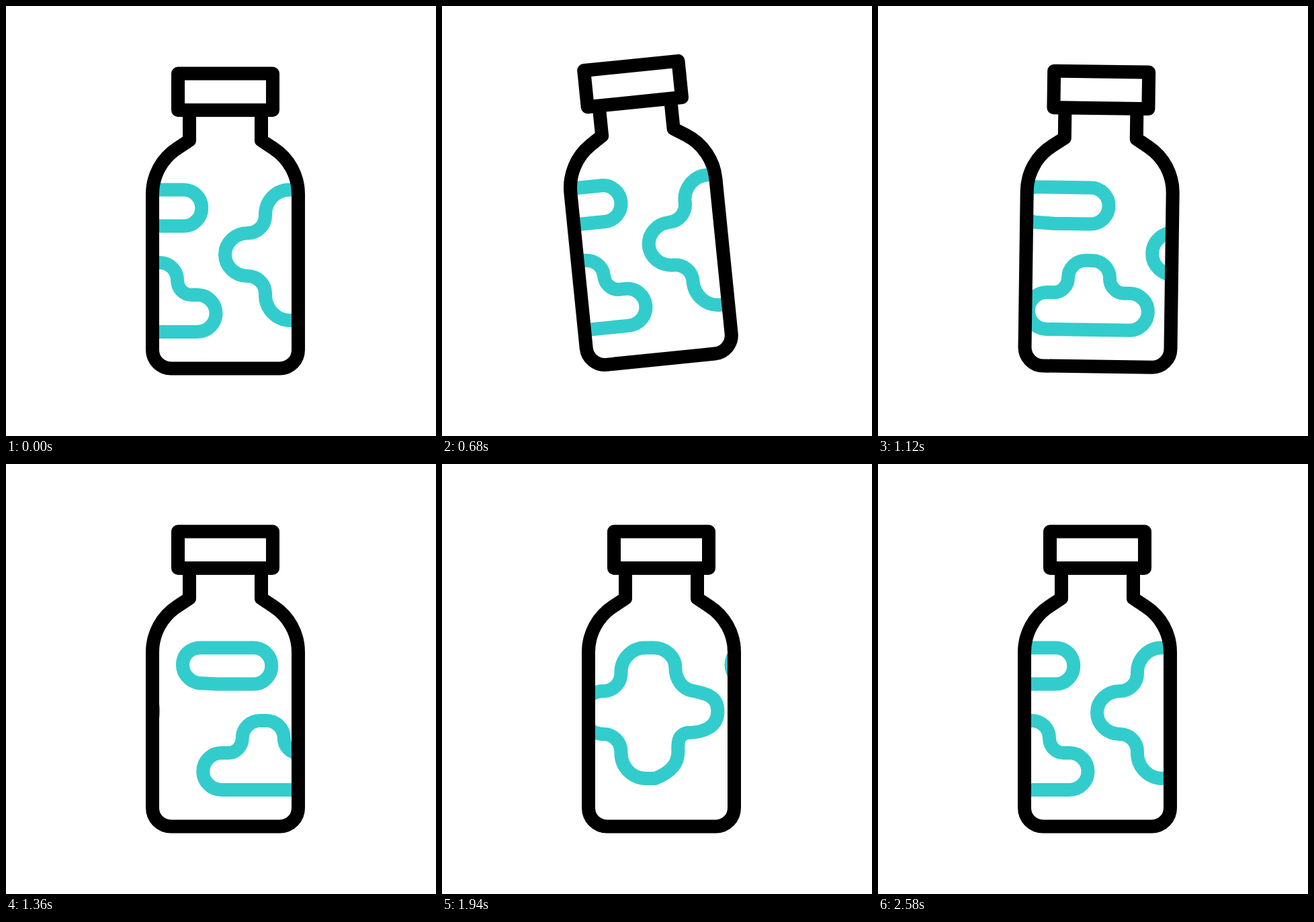
An HTML page that plays this animation: 640x640 px, repeating every 3000 ms.

```html
<!DOCTYPE html>
<html lang="en">
<head>
<meta charset="utf-8">
<title>Bottle</title>
<style>
  html, body { margin: 0; width: 100%; height: 100%; overflow: hidden; background: #fff; }
  svg { display: block; width: 100vw; height: 100vh; }
  path { fill: none; stroke-width: 20; stroke-linejoin: round; }
  .spot { stroke: #33cccc; }
  .glass { stroke: #000; }
</style>
</head>
<body>
<svg viewBox="0 0 640 640">
  <defs>
    <clipPath id="inside"><rect x="218" y="200" width="217" height="340"/></clipPath>
    <path id="pill" class="spot" d="M264.5 273.5A26.8 27 0 0 1 264.5 327.5H210L181 326C168 322 159 312 159 299C159 284 170 273.5 186 273.5Z"/>
    <path id="cloud" class="spot" d="M285 430A27.5 27.5 0 0 1 285 485H162A27.5 27.5 0 0 1 162 430H172A21 22 0 0 0 193 408A26 26 0 0 1 219 382H229A26 26 0 0 1 255 408A21 22 0 0 0 276 430Z"/>
    <path id="blob" class="spot" d="M435 273.5H422A36 36.5 0 0 0 386 310V312A26 26 0 0 1 360 338A34 32 0 0 0 360 402A26 26 0 0 1 386 428V430A37 38 0 0 0 423 468H437C455 461 471 450 471 428C470 408 474 403 484 400C508 400 530 392 530 368C530 344 510 341 490 337C478 334 467 322 467 303C467 287 452 273.5 435 273.5Z"/>
  </defs>
  <g id="bottle">
    <g id="spots" clip-path="url(#inside)"></g>
    <path class="glass" d="M273 155V200L255 211.8A81.4 81.4 0 0 0 218 280V512A27.5 27.5 0 0 0 245.5 539.5H407.5A27.5 27.5 0 0 0 435 512V280A81.4 81.4 0 0 0 398 211.8L380 200V155"/>
    <path class="glass" d="M256 100.5H397V155H256Z"/>
  </g>
</svg>
<script>
const LOOP = 3000;
const bottle = document.getElementById('bottle');
const layer = document.getElementById('spots');

const progress = (t, from, to) => Math.min(1, Math.max(0, (t - from) / (to - from)));
const smooth = (t, from, to) => {
  const u = progress(t, from, to);
  return u * u * (3 - 2 * u);
};

// Lean left, swing three times, then settle upright.
const LEFT = -6, RIGHT = 2.4;
function tilt(t) {
  if (t < 400) return LEFT * smooth(t, 245, 400);
  if (t > 800) return RIGHT * (1 - smooth(t, 800, 1320));
  const swing = (1 - Math.cos(3 * Math.PI * progress(t, 400, 800))) / 2;
  return LEFT + (RIGHT - LEFT) * swing;
}

const lift = t => -14 * smooth(t, 245, 560) * (1 - smooth(t, 640, 1320));

// Each spot travels one lap to the right; its twin follows a lap behind.
function makeSpot(id, lap, easeIn, easeOut) {
  const twins = [0, -lap].map(offset => {
    const node = document.createElementNS('http://www.w3.org/2000/svg', 'use');
    node.setAttribute('href', '#' + id);
    layer.append(node);
    return { node, offset };
  });
  return t => {
    const u = progress(t, 700, 2580);
    const x = lap * (1 - (1 - u ** easeIn) ** easeOut);
    for (const { node, offset } of twins) node.setAttribute('x', x + offset);
  };
}

const spots = [
  makeSpot('pill', 400, 1.75, 1.72),
  makeSpot('cloud', 440, 1.4, 1.7),
  makeSpot('blob', 464, 1.55, 1.82)
];

function draw(t) {
  bottle.setAttribute('transform', `translate(0 ${lift(t)}) rotate(${tilt(t)} 326.5 550)`);
  for (const move of spots) move(t);
}

const start = performance.now();
function tick() {
  draw((performance.now() - start) % LOOP);
  requestAnimationFrame(tick);
}
tick();
</script>
</body>
</html>
```
